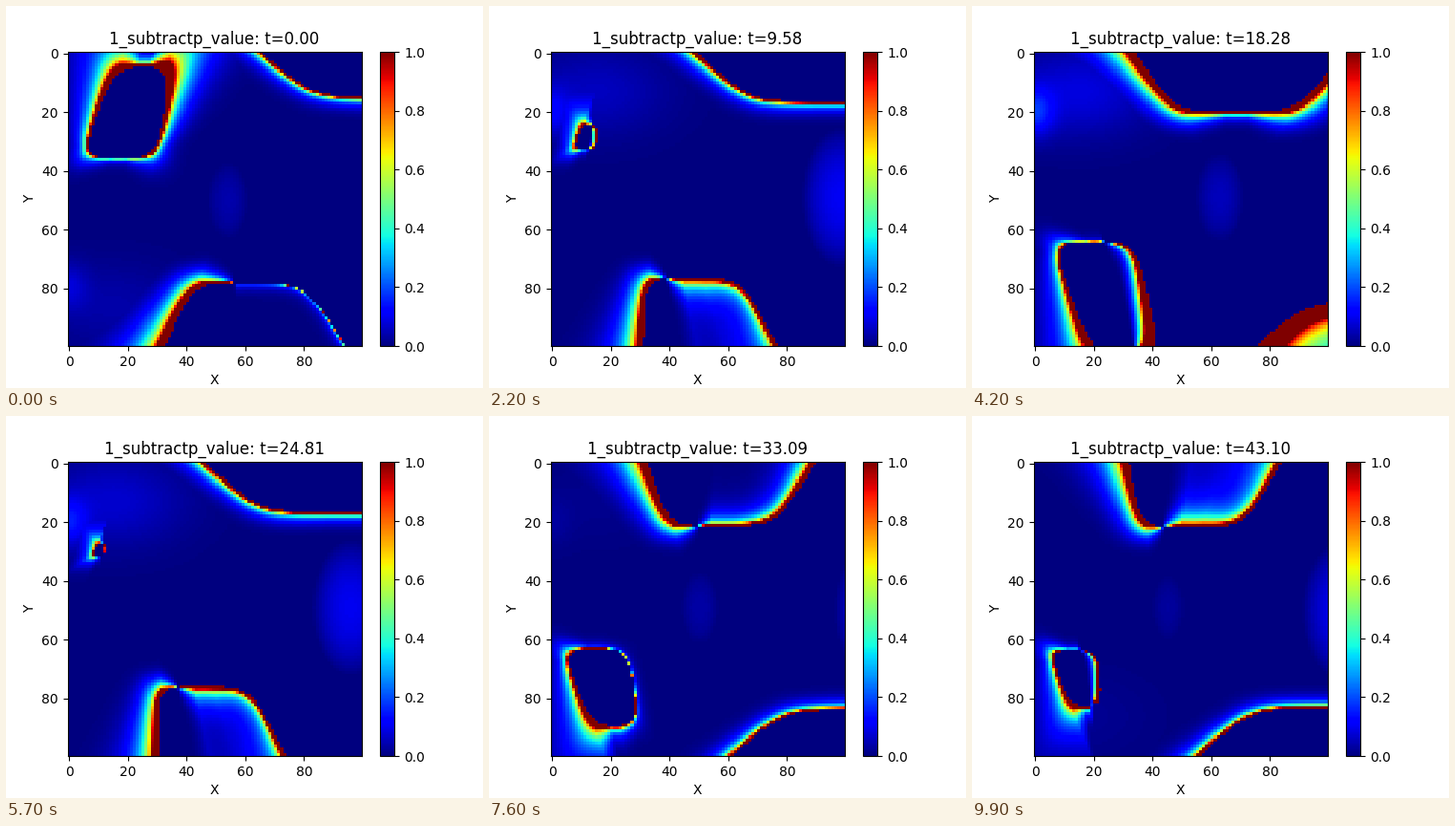
A matplotlib script for the animation above (10000 ms loop, 500x400 px).

```python
import numpy as np
import matplotlib.pyplot as plt
from matplotlib.animation import FuncAnimation

N = 100            # grid cells per side
FRAMES = 100
PERIOD = 11.75     # frames per shedding cycle
DT = 0.43534       # simulated time per frame

H, X = np.mgrid[0:N, 0:N].astype(float)    # H: distance from a wall


def track(*stops):
    """Piecewise linear function of a lobe's age in cycles."""
    at, val = zip(*stops)
    return lambda age: np.interp(age, at, val)


# lobe outline: sides (at height 10), crest and foot
left = track((.35, 16.5), (.47, 13), (.58, 14.5), (.85, 30), (1.22, 47.5),
             (1.35, 57), (1.85, 122))
right = track((.35, 12.5), (.5, 33.6), (.72, 51.5), (1.07, 96), (1.9, 200))
crest = track((.35, 31), (.44, 36.5), (.58, 35), (.86, 23), (1.07, 20), (1.5, 15))
foot = track((.35, 28), (.5, 4), (.58, -4), (.72, -40))

# glow strength along the outline: positive shines outwards, negative inwards
glow_left = track((.35, 2), (.8, 1.8), (1.03, 2.6), (1.25, 1.1), (1.5, .7), (1.57, -5))
glow_top = track((.55, .6), (.72, -1.4), (.93, -2.4), (1.03, .7), (1.5, .8), (1.57, -5))
glow_right = track((.43, -2.5), (.5, 2.5), (.58, -4), (.85, -1), (.97, -1.5),
                   (1.06, 2.5), (1.4, 1.2), (1.57, -5))


def lobe(age):
    """Glow and inside mask of a lobe: strength over signed edge distance."""
    lean_l = -.35 - .75 * np.tanh((age - .98) / .22)
    lean_r = age - .35
    lo = left(age) + lean_l * (10 - H)
    hi = right(age) + lean_r * (10 - H)
    top, base = crest(age), foot(age)
    r = .12 * min(top - base, 30)           # corner rounding
    sides = np.array([(lo - X) / np.hypot(1, lean_l), (X - hi) / np.hypot(1, lean_r),
                      H - top, base - H])
    dist = r * np.logaddexp.reduce(sides / r, axis=0)

    u = (X - lo) / np.maximum(hi - lo, 1)
    power = np.interp(u, [.05, .4, .6, .95],
                      [glow_left(age), glow_top(age), glow_top(age), glow_right(age)])
    power *= np.clip(1.3 - H / 30, .25, 1.3)
    near = np.where(dist < 0, np.minimum(dist, -.1), np.maximum(dist, .1))
    fade = np.exp(-(dist / (3 + 5 * np.abs(power)))**2)
    return np.clip(power / near * fade, 0, 1), dist < 0


def spot(x, h, rx, rh, amp):
    return amp * np.exp(-((X - x) / rx)**2 - ((H - h) / rh)**2)


def inlet(phase):
    """Haze that swells beside the inflow once per cycle."""
    swell = max(0, np.cos(2 * np.pi * (phase - .2)))
    return swell * (spot(0, 20, 6, 8, .2) + spot(15, 13, 24, 15, .12))


def drift(age):
    """Faint oval carried downstream along the centre line."""
    size = np.clip(age - .38, 0, .5)
    r2 = ((X - 45 - 118 * (age - .4255)) / (5 + 17 * size))**2 \
        + ((H - 50) / (10 + 28 * size))**2
    return (.02 + .17 * size) * np.clip(1 - r2, 0, 1) * (age > .38)


def field(i):
    haze = np.zeros((N, N))
    glow = np.zeros((N, N))
    inner = np.zeros((N, N))
    solid = np.zeros((N, N), bool)
    for half, order in ((0, -1), (.5, 1)):      # bottom wall, then top wall
        phase = (i / PERIOD + half) % 1
        haze += inlet(phase)[::order]
        for age in (phase, phase + 1):
            haze += drift(age)[::order]
            if .34 <= age <= 1.85:
                z, inside = (a[::order] for a in lobe(age))
                glow = np.maximum(glow, np.where(inside, 0, z))
                inner = np.maximum(inner, np.where(inside, z, 0))
                solid |= inside
    return np.where(solid, inner, np.maximum(haze, glow))


fig, ax = plt.subplots(figsize=(5, 4), dpi=100)
im = ax.imshow(field(0), cmap="jet", vmin=0, vmax=1)
fig.colorbar(im)
ax.set_xlabel("X")
ax.set_ylabel("Y")
title = ax.set_title("")


def update(i):
    im.set_data(field(i))
    title.set_text(f"1_subtractp_value: t={i * DT:.2f}")
    return im, title


anim = FuncAnimation(fig, update, frames=FRAMES, interval=1000 / 10, repeat=True,
                     repeat_delay=0, blit=False)
plt.show()
```
